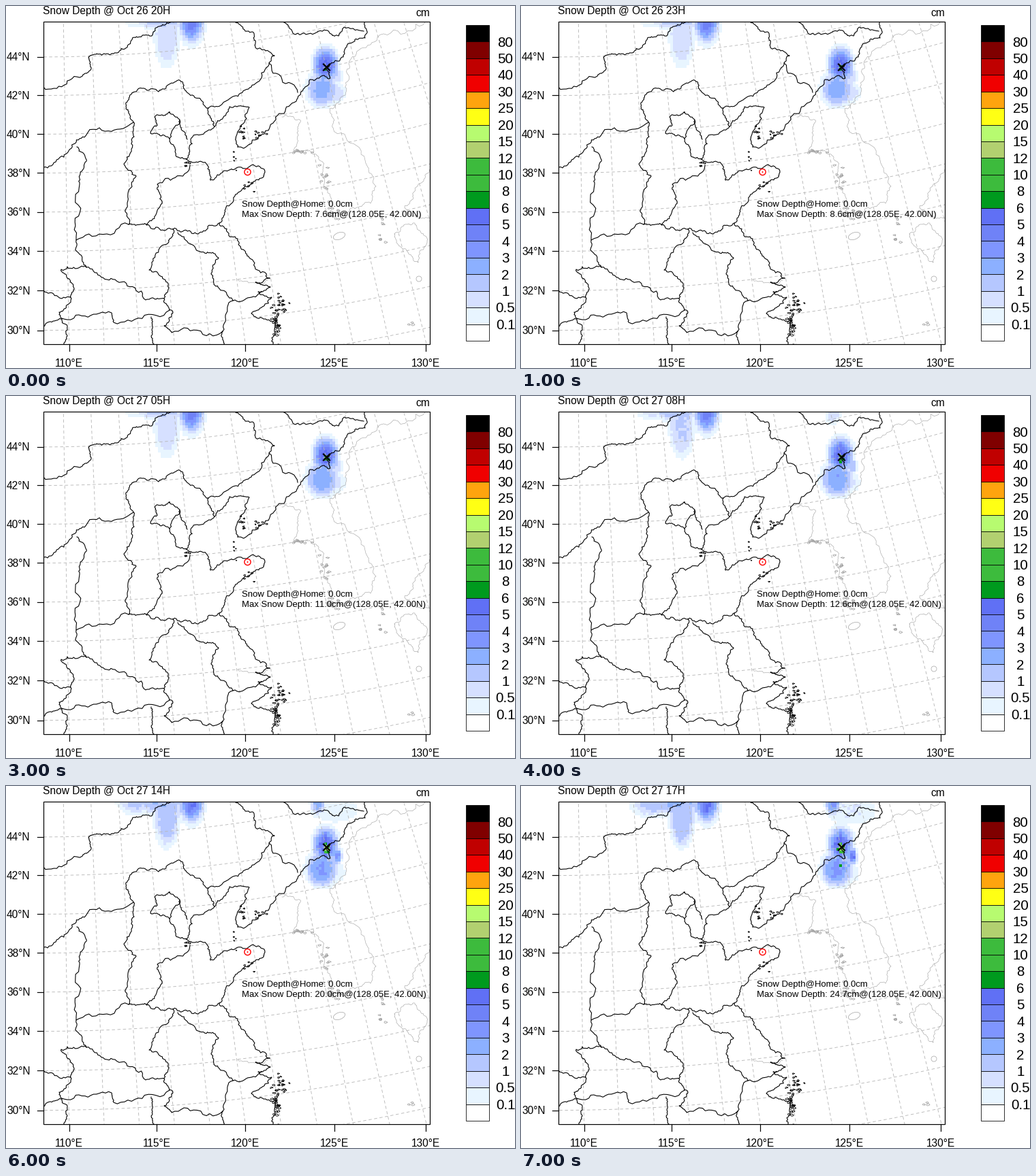
These frames come from a looping animation (747 px wide and 532 px high, 8 s). A matplotlib script:

```python
import numpy as np
import matplotlib.pyplot as plt
from matplotlib.animation import FuncAnimation
from matplotlib.colors import BoundaryNorm, ListedColormap
from matplotlib.patches import Circle, Ellipse, Rectangle

W, H = 747, 532
LEFT, RIGHT, TOP, BOTTOM = 55, 622, 23, 497
CELL = 4
STEPS = 8
GREY = "#a4a4a4"
LEVELS = [0.1, 0.5, 1, 2, 3, 4, 5, 6, 8, 10, 12, 15, 20, 25, 30, 40, 50, 80]
COLORS = ["#ffffff", "#e8f5ff", "#d6e0ff", "#b5c7ff", "#8cb0ff", "#7f95ff",
          "#6f82f7", "#6070f5", "#009a1e", "#3dbb3d", "#3dbb3d", "#b2d070",
          "#b7fb70", "#ffff14", "#ffa40e", "#f00000", "#c00000", "#800000",
          "#000000"]
PEAKS = [7.6, 8.6, 9.8, 11.0, 12.6, 15.5, 20.0, 24.7]

plt.rcParams["font.family"] = "Liberation Sans"
rng = np.random.default_rng(4)
fig = plt.figure(figsize=(W / 72, H / 72), dpi=72, facecolor="white")


def pixel_axes(x0, y0, x1, y1):
    """Axes over a box of the stage, with pixel coordinates, y downwards."""
    ax = fig.add_axes([x0 / W, 1 - y1 / H, (x1 - x0) / W, (y1 - y0) / H])
    ax.set(xlim=(x0, x1), ylim=(y1, y0), autoscale_on=False)
    ax.axis("off")
    return ax


chart = pixel_axes(LEFT, TOP, RIGHT, BOTTOM)
page = pixel_axes(0, 0, W, H)


def label(x, y, s, size=15.5, ha="left"):
    return page.text(x, y, s, fontsize=size, ha=ha, va="baseline")


def box(x, y, w, h, color="none", lw=0.8):
    page.add_patch(Rectangle((x, y), w, h, fc=color, ec="black", lw=lw))


def roughen(pts, rounds=4):
    """Midpoint displacement, so a few points read as a natural border."""
    for i in range(rounds):
        d = np.diff(pts, axis=0)
        normal = np.column_stack([-d[:, 1], d[:, 0]])
        amp = 0.12 + 0.06 * i
        mid = pts[:-1] + d / 2 + normal * rng.uniform(-amp, amp, (len(d), 1))
        out = np.empty((len(pts) + len(mid), 2))
        out[::2], out[1::2] = pts, mid
        pts = out
    return pts


def border(*xy, color="black", lw=1.1):
    pts = roughen(np.array(xy, float).reshape(-1, 2))
    chart.plot(*pts.T, color=color, lw=lw, zorder=4)


def shore(*xy):
    border(*xy, color=GREY, lw=0.6)


def islands(n, x, y, sx, sy, color="black", size=1.5):
    for cx, cy in rng.normal((x, y), (sx, sy), (n, 2)):
        a = np.linspace(0, 2 * np.pi, 7)
        r = size * rng.uniform(0.3, 1, 7)
        r[-1] = r[0]
        chart.plot(cx + 1.4 * r * np.cos(a), cy + r * np.sin(a),
                   color=color, lw=0.8, zorder=4)


def project(lon, lat):
    """Conic map projection to stage pixels."""
    d = lat - 30
    a = np.radians(0.59 * (lon - 108.5))
    rho = 2474 - (29.15 * d - 0.033 * d * d) / 0.976
    x = 54 + (2474 - 32.5 * d) * np.sin(a)
    return x, 476.5 - 0.976 * (2474 - rho * np.cos(a))


def draw_grid():
    style = dict(color="#b8b8b8", lw=0.9, dashes=(5, 4), zorder=2)
    for lon in range(108, 140, 2):
        chart.plot(*project(lon, np.linspace(27, 48, 60)), **style)
    for lat in range(28, 48, 2):
        chart.plot(*project(np.linspace(107, 136, 60), lat), **style)


def draw_frame():
    box(LEFT - 0.5, TOP - 0.5, RIGHT - LEFT, BOTTOM - TOP, lw=1.2)
    for lat in range(30, 46, 2):
        y = project(108.5, lat)[1]
        page.plot([46, LEFT], [y, y], color="black", lw=1.2)
        label(35.5, y + 5.2, f"{lat}°N", ha="right")
    for lon in range(110, 135, 5):
        x = 54 + 2495 * np.tan(np.radians(0.59 * (lon - 108.5)))
        page.plot([x, x], [BOTTOM, 507], color="black", lw=1.2)
        label(x, 530, f"{lon}°E", ha="center")


def draw_colorbar():
    step = 464 / len(COLORS)
    for i, color in enumerate(reversed(COLORS)):
        box(675, 28 + i * step, 34, step, color)
    for i, level in enumerate(reversed(LEVELS), 1):
        label(733, 28 + i * step + 7.2, f"{level:g}", 20.5, "center")


def draw_north():
    border(55, 119, 112, 103, 125, 92, 121, 76, 133, 70, 163, 69, 188, 46,
           214, 44, 220, 32, 247, 23)
    border(55, 237, 92, 213, 120, 186, 187, 171, 176, 151, 186, 127,
           224, 126, 256, 110, 267, 128, 297, 150, 306, 177)
    border(297, 150, 330, 135, 366, 114, 394, 73, 367, 62, 362, 38, 334, 23)
    border(386, 84, 428, 127)
    border(407, 23, 420, 37, 467, 35, 488, 44, 497, 31, 525, 37)
    border(526, 23, 527, 47, 502, 55, 490, 80, 470, 90, 476, 106, 446, 108,
           427, 137, 392, 172, 340, 207)
    border(240, 156, 255, 168, 240, 195, 212, 187, 222, 175, 218, 163,
           240, 156)
    border(255, 168, 266, 196)
    border(240, 195, 252, 222, 265, 225)
    border(187, 171, 188, 192, 173, 232, 191, 250, 178, 292, 180, 321)
    border(104, 207, 118, 228, 108, 262, 103, 344, 180, 321, 207, 321)


def draw_coast():
    border(340, 207, 338, 191, 357, 149, 328, 148, 306, 177, 272, 194,
           264, 225, 295, 233, 300, 256, 322, 242, 340, 237, 379, 240,
           378, 251, 349, 267, 322, 299, 313, 319, 340, 342, 357, 370,
           387, 400)
    border(387, 400, 366, 406, 388, 413, 370, 420, 390, 428, 360, 452,
           398, 461, 392, 497)
    islands(9, 347, 189, 4, 5)
    islands(8, 373, 188, 7, 4)
    islands(5, 335, 226, 2, 6, size=1)
    islands(5, 268, 232, 4, 3)
    islands(6, 362, 263, 8, 5)
    islands(20, 404, 440, 5, 9)
    islands(26, 397, 464, 4, 13, size=2)


def draw_south():
    border(270, 234, 222, 262, 229, 290, 206, 322, 245, 328, 282, 335,
           313, 319)
    border(245, 328, 236, 350, 210, 388, 238, 408, 232, 430, 245, 450,
           232, 470, 243, 480, 318, 478, 320, 497)
    border(252, 333, 285, 361, 312, 370, 301, 393, 306, 410, 333, 433,
           375, 420)
    border(333, 433, 318, 478)
    border(103, 344, 118, 384, 160, 402, 205, 432, 232, 430)
    border(118, 384, 81, 387, 97, 408, 96, 430, 78, 450, 90, 475, 85, 497)
    border(55, 418, 95, 428)
    border(55, 471, 85, 460, 155, 451, 158, 465, 240, 447)
    border(213, 457, 213, 485, 217, 497)


def draw_far_shores():
    shore(405, 163, 432, 168, 428, 182, 422, 213, 455, 218, 465, 240,
          478, 285, 475, 308, 500, 304, 535, 290, 543, 265, 530, 235,
          480, 179, 475, 151, 498, 131, 503, 85, 545, 46, 622, 23)
    shore(622, 240, 601, 267, 597, 284, 585, 294, 591, 305, 622, 312)
    shore(570, 335, 600, 319, 618, 345, 605, 377, 592, 365, 575, 350,
          570, 335)
    shore(340, 402, 384, 403)
    for n, x, y, sx, sy in ((10, 435, 214, 8, 4), (12, 467, 248, 5, 13),
                            (18, 485, 302, 12, 6), (4, 553, 309, 2, 6),
                            (5, 551, 343, 4, 4), (3, 593, 465, 4, 4)):
        islands(n, x, y, sx, sy, GREY, 2)
    chart.add_patch(Ellipse((489, 338), 18, 10, angle=-20, fill=False,
                            ec=GREY, lw=0.7))
    chart.add_patch(Circle((606, 401), 4, fill=False, ec=GREY, lw=0.7))


X, Y = np.meshgrid(np.arange(LEFT, RIGHT, CELL) + CELL / 2,
                   np.arange(TOP, 151, CELL) + CELL / 2)
speckle = rng.normal(0, 1, X.shape)


def blob(x, y, rx, ry, amp, power=1.5):
    q = ((X - x) / rx) ** 2 + ((Y - y) / ry) ** 2
    return amp * np.exp(-q ** power)


def ramp(step, start, end=7):
    return min(max((step - start) / (end - start), 0), 1)


def snow(step):
    """Depth in cm: patches that spread and deepen at their own pace."""
    grow, late, last = ramp(step, 0), ramp(step, 3), ramp(step, 5)
    spots = ramp(step, 6)
    depth = np.max([
        # north-western patch
        blob(272, 20, 15, 27, 4.7 + 0.3 * late),
        blob(236, 40, 17, 45, 0.85 + 0.75 * late, 2.5),
        blob(228, 20, 32, 11 + 8 * late, 1.8 + 0.5 * late),
        blob(192, 20, 17 + 8 * late, 10 + 10 * late, 0.4 + 1.4 * late),
        # patch around the peak
        blob(469, 87, 15, 21, 5.2),
        blob(470, 92, 4, 7, PEAKS[step], 1),
        blob(464, 122, 20, 22, 2.3 + 0.8 * grow, 1.8),
        blob(484, 127, 12, 13, 0.9 - 0.5 * grow, 2),
        blob(486, 103, 6, 10, 1 + 3.6 * late),
        # band along the northern edge
        blob(458, 24, 9, 16, 0.2 + 3 * late if late else 0),
        blob(485, 36, 32, 18, 0.5 * last, 2),
        # deepest spots
        blob(274, 38, 3, 3, 7.5 * spots),
        blob(487, 105, 3, 3, 7.5 * spots),
        blob(470, 118, 3, 3, 7.5 * spots),
    ], axis=0)
    return depth * np.exp((0.04 + 0.08 * late) * speckle)


draw_grid()
draw_far_shores()
draw_north()
draw_coast()
draw_south()
draw_frame()
draw_colorbar()

field = chart.imshow(snow(0), cmap=ListedColormap(COLORS),
                     norm=BoundaryNorm([-1] + LEVELS + [999], len(COLORS)),
                     extent=(LEFT, LEFT + CELL * X.shape[1],
                             TOP + CELL * X.shape[0], TOP),
                     interpolation="nearest", aspect="auto", zorder=0)
chart.set(xlim=(LEFT, RIGHT), ylim=(BOTTOM, TOP))

for dy in (4.5, -4.5):
    page.plot([466, 475], [90 - dy, 90 + dy], color="black", lw=2.2)
page.add_patch(Circle((354.5, 244), 4.6, fill=False, ec="red", lw=1.4))
page.add_patch(Circle((354.5, 244), 1, color="red", lw=0))

label(RIGHT, 15, "cm", ha="right")
label(346.5, 295.5, "Snow Depth@Home: 0.0cm", 13.15)
title = label(54, 12, "")
peak = label(346.5, 310, "", 13.15)


def update(step):
    day, hour = divmod(20 + 3 * step, 24)
    title.set_text(f"Snow Depth @ Oct {26 + day} {hour:02d}H")
    peak.set_text(f"Max Snow Depth: {PEAKS[step]:.1f}cm@(128.05E, 42.00N)")
    field.set_data(snow(step))
    return title, peak, field


anim = FuncAnimation(fig, update, frames=STEPS, interval=1000, repeat=True,
                     repeat_delay=0, blit=False)
plt.show()
```
